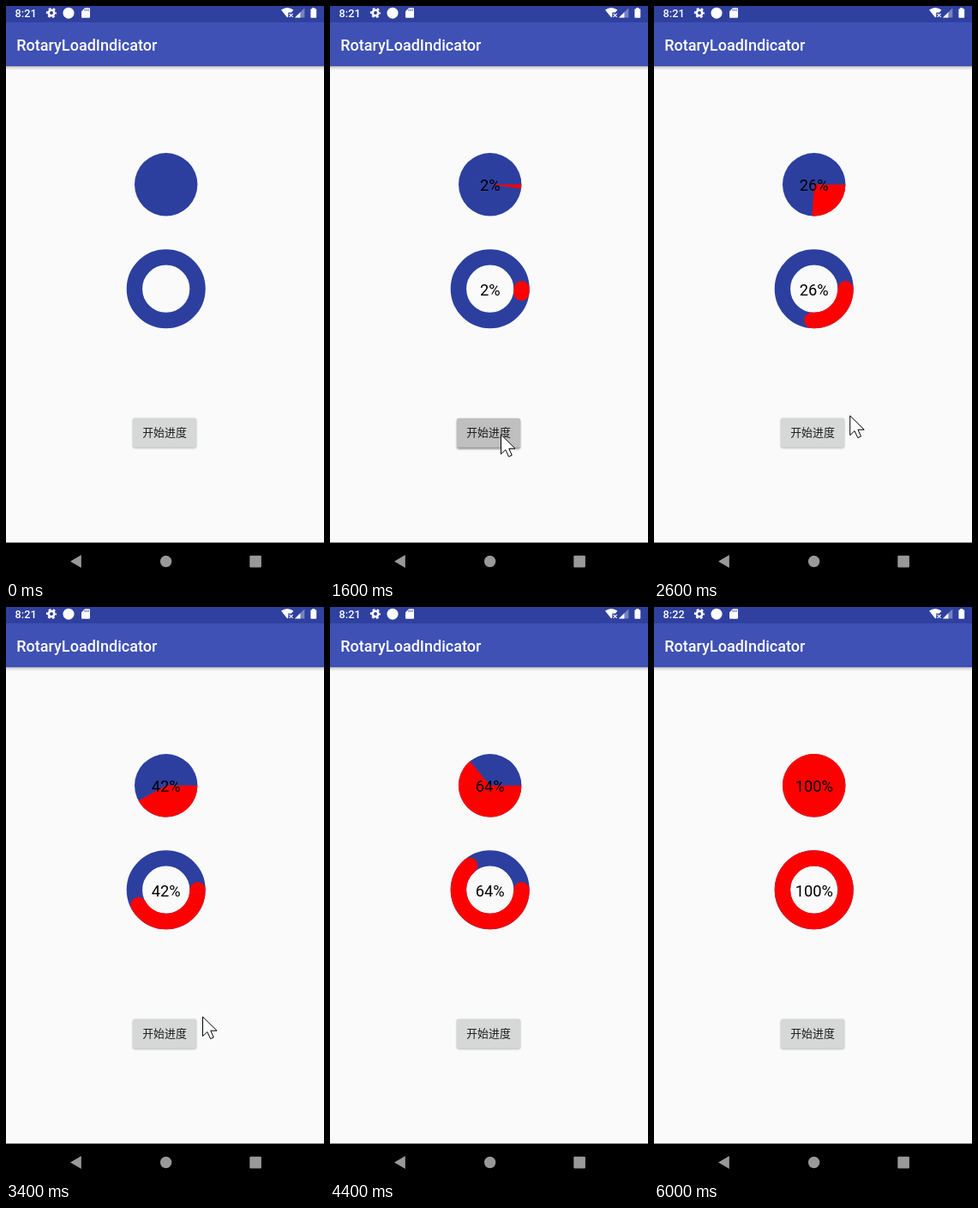
An HTML page for the animation above (7100 ms loop, 371 by 667 pixels).

```html
<!DOCTYPE html>
<html lang="zh">
<head>
<meta charset="utf-8">
<title>Progress</title>
<style>
  html, body { margin: 0; width: 100%; height: 100%; overflow: hidden; background: #fafafa; }
  svg { display: block; width: 371px; height: 667px; }
  text { font-family: Roboto, sans-serif; }
  .bar { fill: #fff; font-weight: 500; }
  .num { font-size: 18.3px; text-anchor: middle; }
  .btn { font: 12.9px "Noto Sans CJK SC", "Noto Sans CJK", sans-serif; text-anchor: middle; fill: #1c1c1c; }
</style>
</head>
<body>
<svg viewBox="0 0 371 667">
  <defs>
    <linearGradient id="fade" x2="0" y2="1">
      <stop stop-opacity=".3"/>
      <stop offset=".4" stop-opacity=".1"/>
      <stop offset="1" stop-opacity="0"/>
    </linearGradient>
    <filter id="soft" x="-10%" y="-20%" width="120%" height="150%"><feGaussianBlur stdDeviation="1"/></filter>
  </defs>

  <rect width="371" height="667" fill="#fafafa"/>
  <rect y="70" width="371" height="5" fill="url(#fade)"/>
  <rect y="18" width="371" height="52" fill="#3f51b5"/>
  <rect width="371" height="19" fill="#2f409f"/>
  <text class="bar" id="clock" x="10.6" y="12.8" font-size="12.7">8:21</text>
  <text class="bar" x="12.3" y="51.7" font-size="18.05">RotaryLoadIndicator</text>

  <g fill="#fff">
    <g fill="none" stroke="#fff">
      <circle cx="53" cy="8" r="3.3" stroke-width="2.6"/>
      <circle cx="53" cy="8" r="5.2" stroke-width="1.8" stroke-dasharray="2.7 2.745" stroke-dashoffset="1.35"/>
    </g>
    <circle cx="73" cy="8.2" r="6.5"/>
    <path d="M92 2.2h5q1 0 1 1v9.6q0 1-1 1h-8q-1 0-1-1V6.2z"/>
    <path d="M328.2 13.6 321 4.6Q328 -.4 335.4 4.6L333 7.6H329.3V12.3z"/>
    <path d="M330.6 8.8l4 4m0-4l-4 4" stroke="#fff" stroke-width="1.2"/>
    <path d="M348.3 2.2V13.6H337z" opacity=".35"/>
    <path d="M343.4 7.2V13.6H337z"/>
    <path d="M357.2 2h3v1.2h1.2q.8 0 .8.8v9q0 .8-.8.8h-5.2q-.8 0-.8-.8v-9q0-.8.8-.8h1z"/>
  </g>
  <path d="M92 3.6v2.2M94.1 3.6v2.2M96.2 3.6v2.2" stroke="#2f409f" stroke-width=".9"/>

  <circle cx="186.7" cy="207.8" r="36.7" fill="#2c3f9f"/>
  <path id="pie" fill="red"/>
  <circle cx="186.7" cy="329.2" r="36.8" fill="none" stroke="#2c3f9f" stroke-width="18.4"/>
  <path id="ring" fill="none" stroke="red" stroke-width="18.4" stroke-linecap="round"/>
  <text class="num" x="186.8" y="215.2"></text>
  <text class="num" x="186.8" y="336.6"></text>

  <rect id="shade" x="148" y="481" width="74" height="34" rx="2" filter="url(#soft)"/>
  <rect x="148" y="479.7" width="74" height="34" rx="2" fill="#d6d7d7"/>
  <rect id="press" x="148" y="479.7" width="74" height="34" rx="2"/>
  <text class="btn" x="185" y="501.2">开始进度</text>

  <rect y="624.6" width="371" height="43"/>
  <g fill="#999">
    <path d="M75 646.5l12.8-7.6v15.2z"/>
    <circle cx="186.6" cy="646.5" r="6.7"/>
    <rect x="284.3" y="639.8" width="13.6" height="13.6" rx="1"/>
  </g>

  <path id="cursor" d="M.5 1V23.6L5.8 18.6 9.6 26.6 13.2 25 9.8 17.2H17z" fill="#fff" stroke="#000" stroke-linejoin="round"/>
</svg>
<script>
  const LOOP = 7100, STEP = 100;
  // Each row: time in ms, then values
  const PROGRESS = [[1500, 0], [1600, 2], [2600, 26], [3400, 42], [4400, 64],
    [4500, 66], [4600, 66], [4700, 71], [5100, 80], [6000, 100]];
  const POINTER = [[200, 305, 281], [500, 238, 394], [900, 195, 464], [1100, 199, 498],
    [2100, 199, 498], [2500, 228, 476], [3000, 229, 476], [3600, 229, 476],
    [3700, 254, 438], [3800, 281, 392], [3900, 340, 300]];
  const PRESS = [[1300, 0], [1500, .11], [1700, .11], [1900, 0]];

  const byId = id => document.getElementById(id);
  const [clock, pie, ring, shade, press, cursor] =
    ["clock", "pie", "ring", "shade", "press", "cursor"].map(byId);
  const labels = document.querySelectorAll(".num");

  function sample(rows, t) {
    const i = rows.findIndex(row => row[0] > t);
    if (i === 0) return rows[0].slice(1);
    if (i < 0) return rows[rows.length - 1].slice(1);
    const a = rows[i - 1], b = rows[i], k = (t - a[0]) / (b[0] - a[0]);
    return a.slice(1).map((v, j) => v + (b[j + 1] - v) * k);
  }

  function arc(cx, cy, r, percent) {
    const angle = Math.min(percent / 100, .9999) * 2 * Math.PI;
    const x = cx + r * Math.cos(angle), y = cy + r * Math.sin(angle);
    return `M${cx + r} ${cy}A${r} ${r} 0 ${percent > 50 ? 1 : 0} 1 ${x} ${y}`;
  }

  function draw(time) {
    const t = Math.floor(time / STEP) * STEP;
    const percent = Math.round(sample(PROGRESS, t)[0]);
    pie.setAttribute("d", percent ? arc(186.7, 207.8, 36.7, percent) + "L186.7 207.8z" : "");
    ring.setAttribute("d", percent ? arc(186.7, 329.2, 36.8, percent) : "");
    labels.forEach(label => label.textContent = percent ? percent + "%" : "");
    clock.textContent = t < 5800 ? "8:21" : "8:22";

    const [dark] = sample(PRESS, t);
    press.setAttribute("opacity", dark);
    shade.setAttribute("opacity", .32 + dark);
    shade.setAttribute("y", 480.6 + dark * 10);

    const [x, y] = sample(POINTER, t);
    cursor.setAttribute("transform", `translate(${x} ${y})`);
    cursor.setAttribute("visibility", t >= 200 && t < 4000 ? "visible" : "hidden");
  }

  const start = performance.now();
  function tick() {
    draw((performance.now() - start) % LOOP);
    requestAnimationFrame(tick);
  }
  tick();
</script>
</body>
</html>
```
